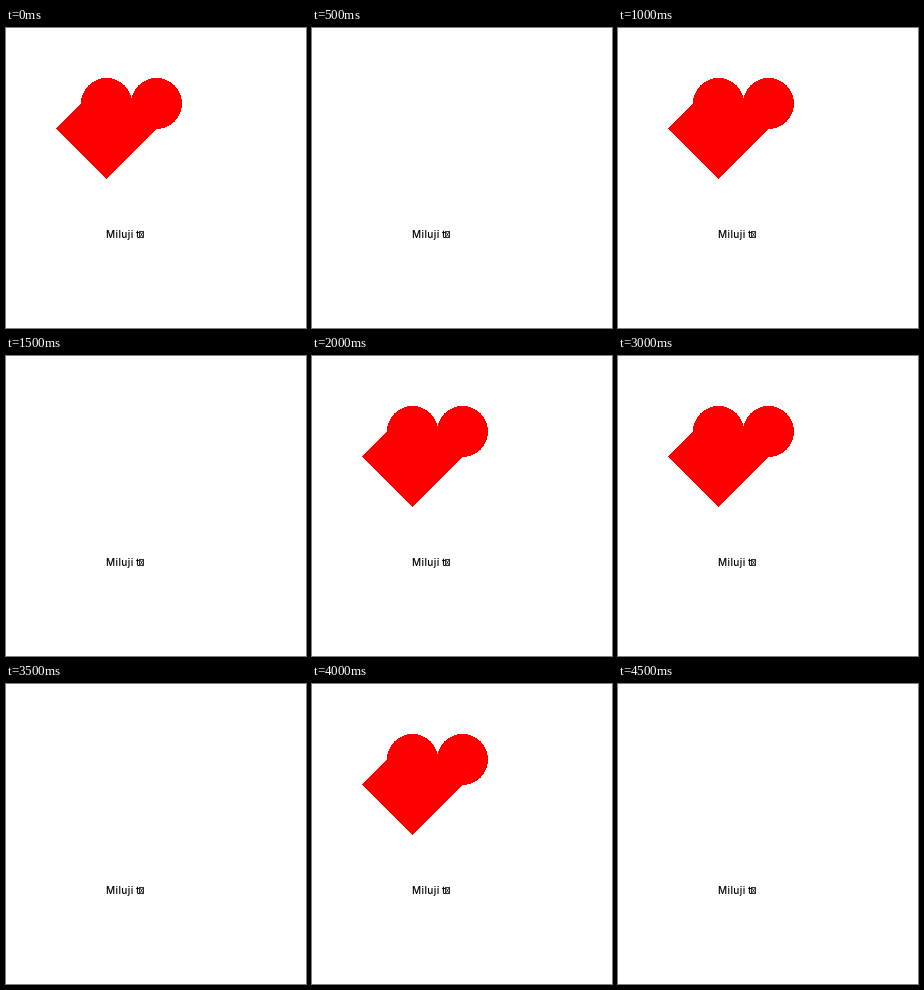
An HTML page that plays this animation: 300x300 px, repeating every 5000 ms.

```html
<!DOCTYPE html>
<html lang="cs">
<head>
<meta charset="utf-8">
<title>Miluji tě</title>
<style>
  html, body { margin: 0; width: 100%; height: 100%; overflow: hidden; background: #fff; }
  svg { display: block; width: 100%; height: 100%; }
  text { font: 500 10px Inter, sans-serif; letter-spacing: .4px; word-spacing: -.6px; }
</style>
</head>
<body>
<svg viewBox="0 0 300 300">
  <g id="heart" fill="#f00" shape-rendering="crispEdges">
    <circle cx="100.5" cy="75.5" r="25.5"/>
    <circle cx="150.5" cy="75.5" r="25.5"/>
    <path d="M50 100.5L100.5 50L151 100.5L100.5 151Z"/>
  </g>
  <text x="100" y="210">Miluji t</text>
  <path d="M133.5 203.5h4v6h-4zl4 6m0-6l-4 6" fill="none" stroke="#000" stroke-width=".8"/>
</svg>
<script>
  const HALF = 500;
  const LOOP = 5000;
  const heart = document.getElementById("heart");
  const start = performance.now();

  function draw(ms) {
    const beat = Math.floor((ms % LOOP) / HALF);
    heart.setAttribute("visibility", beat % 2 ? "hidden" : "visible");
  }

  function tick(now) {
    draw(Math.max(0, now - start));
    requestAnimationFrame(tick);
  }

  draw(0);
  requestAnimationFrame(tick);
</script>
</body>
</html>
```
